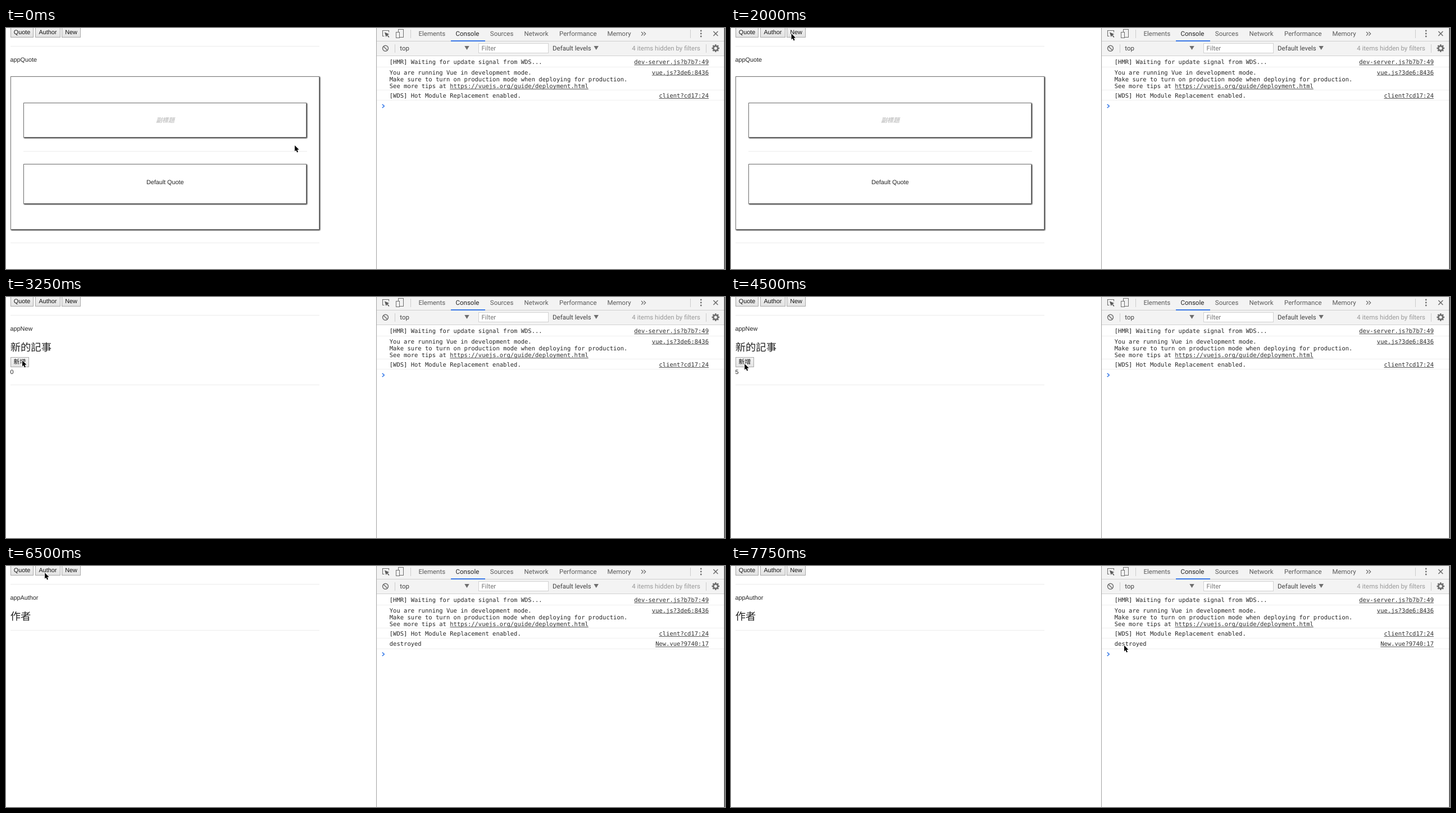
Recreate the animation shown at these times as an HTML page with a canvas. Size 1280 px wide and 429 px high, loop 8 s.

```html
<!DOCTYPE html>
<html lang="zh-Hant">
<head>
<meta charset="utf-8">
<title>Component switching</title>
<style>
  html, body { margin: 0; width: 100%; height: 100%; overflow: hidden; background: #fff; }
  canvas { display: block; }
</style>
</head>
<body>
<canvas id="stage" width="1280" height="429"></canvas>
<script>
const ctx = document.getElementById('stage').getContext('2d');
const LOOP = 8000;
const PAGE = '10.8px "Liberation Sans", Arial, sans-serif';
const CJK = '"Noto Sans CJK TC", "Noto Sans CJK JP", "Noto Sans CJK", sans-serif';
const UI = '11.5px Roboto, sans-serif';
const MONO = '10.5px "DejaVu Sans Mono", monospace';

// [start ms, tip x, tip y]
const cursorPath = [
  [0, 514, 209], [500, 480.5, 195], [750, 159.5, 71.5], [1000, 119.3, 26.8],
  [1250, 107.5, 10], [3000, 88.8, 60.5], [3250, 29, 113], [3500, 24.2, 119],
  [5000, 37.3, 67], [5250, 59.3, 11.8], [5500, 66, 10], [6500, 69, 12],
  [6750, 940, 85], [7000, 706, 150], [7250, 696.8, 148.5], [7500, 703.8, 143.5],
  [7750, 700, 141.3]
];
const counts = [[0, 0], [3750, 1], [4000, 2], [4250, 4], [4500, 5]];
const pages = [[0, 'quote'], [2500, 'new'], [6500, 'author']];

const at = (keys, t) => keys.filter(k => k[0] <= t).pop();

function text(str, x, y, font = PAGE, color = '#222', align = 'left') {
  ctx.font = font;
  ctx.fillStyle = color;
  ctx.textAlign = align;
  ctx.fillText(str, x, y);
}

function rect(x, y, w, h, color) {
  ctx.fillStyle = color;
  ctx.fillRect(x, y, w, h);
}

function outline(x, y, w, h, color) {
  ctx.lineWidth = 1;
  ctx.strokeStyle = color;
  ctx.strokeRect(x + 0.5, y + 0.5, w - 1, h - 1);
}

function line(points, color, width = 1) {
  ctx.beginPath();
  points.forEach(([x, y]) => ctx.lineTo(x, y));
  ctx.lineWidth = width;
  ctx.strokeStyle = color;
  ctx.stroke();
}

function polygon(points, color) {
  ctx.beginPath();
  points.forEach(([x, y]) => ctx.lineTo(x, y));
  ctx.closePath();
  ctx.fillStyle = color;
  ctx.fill();
}

function circle(x, y, r, color, width) {
  ctx.beginPath();
  ctx.arc(x, y, r, 0, Math.PI * 2);
  ctx.lineWidth = width || 1;
  ctx.fillStyle = ctx.strokeStyle = color;
  width ? ctx.stroke() : ctx.fill();
}

function button(label, x, y, w, h, baseline, font = PAGE, pressed = false) {
  const fill = ctx.createLinearGradient(0, y, 0, y + h);
  fill.addColorStop(0, pressed ? '#d4d4d4' : '#f4f4f4');
  fill.addColorStop(1, pressed ? '#ececec' : '#e2e2e2');
  rect(x, y, w, h, fill);
  outline(x, y, w, h, '#a9a9a9');
  text(label, x + w / 2, baseline, font, '#111', 'center');
}

function card(x, y, w, h) {
  ctx.save();
  ctx.shadowColor = '#000';
  ctx.shadowBlur = 2;
  ctx.shadowOffsetX = ctx.shadowOffsetY = 1;
  rect(x, y, w, h, '#fff');
  ctx.restore();
  outline(x, y, w, h, '#777');
}

const rule = (y, x = 8, w = 550) => rect(x, y, w, 1, '#ececec');

const drawPage = {
  quote() {
    text('appQuote', 7.6, 60);
    card(8, 86, 550, 273);
    card(31, 133, 504, 62);
    rule(219, 31, 505);
    card(31, 242, 504, 71);
    text('副標題', 283.5, 168, 'italic bold 10.9px ' + CJK, '#c8c8c8', 'center');
    text('Default Quote', 283.2, 277.7, PAGE, '#222', 'center');
    rule(382);
  },
  new(t) {
    text('appNew', 7.6, 60);
    text('新的記事', 7.8, 95.8, '500 18.3px ' + CJK);
    button('新增', 8, 107, 33, 18, 119.4, '10.9px ' + CJK, t >= 4000 && t < 4250);
    text(at(counts, t)[1], 7.6, 137);
    rule(156);
  },
  author() {
    text('appAuthor', 7.6, 60);
    text('作者', 7.8, 95.8, '500 18.3px ' + CJK);
    rule(114);
  }
};

function inspectIcon() {
  line([[673.5, 14.5], [670.5, 14.5], [670.5, 4.5], [681.5, 4.5], [681.5, 7.5]], '#6e6e6e', 1.1);
  polygon([[674, 7.5], [682.3, 11], [679.4, 12.2], [682.5, 16], [681.2, 17],
    [678.3, 13.3], [676.5, 16]], '#5a5a5a');
}

function deviceIcon() {
  outline(698, 2, 10, 15, '#6e6e6e');
  rect(694, 7, 7, 11, '#f3f3f3');
  outline(694, 7, 7, 11, '#6e6e6e');
}

function gear(x, y) {
  for (let i = 0; i < 8; i++) {
    const a = i * Math.PI / 4, c = Math.cos(a), s = Math.sin(a);
    line([[x + c * 3.5, y + s * 3.5], [x + c * 6.8, y + s * 6.8]], '#6e6e6e', 2.6);
  }
  circle(x, y, 3.9, '#6e6e6e', 2.6);
}

function toolbars() {
  rect(660, 0, 619, 49, '#f3f3f3');
  rect(660, 23, 619, 1, '#cfcfcf');
  rect(660, 49, 619, 1, '#d0d0d0');
  inspectIcon();
  deviceIcon();
  [[720, 3], [1218, 3], [692, 29], [1246, 29]].forEach(([x, y]) => rect(x, y, 1, 15, '#ccc'));

  [['Elements', 734.5], ['Console', 800.5], ['Sources', 861.8], ['Network', 922.6],
   ['Performance', 985], ['Memory', 1070.4]].forEach(([name, x]) =>
    text(name, x, 14, UI, name === 'Console' ? '#222' : '#5a5a5a'));
  rect(792, 22, 61, 2, '#3b78e7');
  [1131, 1135.4].forEach(x => line([[x, 7], [x + 3.3, 10.3], [x, 13.6]], '#6e6e6e', 1.3));
  [5, 10, 15].forEach(y => circle(1237.3, y, 1.4, '#6e6e6e'));
  line([[1259.4, 6], [1267.4, 14]], '#6e6e6e', 1.6);
  line([[1267.4, 6], [1259.4, 14]], '#6e6e6e', 1.6);

  circle(675.5, 36.3, 5, '#6e6e6e', 1.5);
  line([[672, 32.8], [679, 39.8]], '#6e6e6e', 1.5);
  text('top', 701.3, 40.3, UI, '#444');
  [[820.5, 32], [1050.7, 32]].forEach(([x, y]) =>
    polygon([[x - 4.2, y], [x + 4.2, y], [x, y + 7]], '#6e6e6e'));
  rect(841, 27, 125, 18, '#fff');
  outline(841, 27, 125, 18, '#d2d2d2');
  text('Filter', 846.5, 40.3, UI, '#777');
  text('Default levels', 973, 40.3, UI, '#444');
  text('4 items hidden by filters', 1236, 40.3, UI, '#9a9a9a', 'right');
  gear(1263.3, 36);
}

function link(str, x, baseline, align = 'left') {
  text(str, x, baseline, MONO, '#303030', align);
  const w = ctx.measureText(str).width;
  rect(align === 'right' ? x - w : x, baseline + 1, w, 1, '#555');
}

function message(lines, baseline, source, bottom) {
  lines.forEach((str, i) => text(str, 682.8, baseline + i * 12.3, MONO, '#262626'));
  link(source, 1251, baseline, 'right');
  rect(660, bottom, 619, 1, '#efefef');
}

function consolePanel(destroyed) {
  rect(659, 0, 1, 429, '#a3a3a3');
  toolbars();
  message(['[HMR] Waiting for update signal from WDS...'], 64.2, 'dev-server.js?b7b7:49', 69);
  message([
    'You are running Vue in development mode.',
    'Make sure to turn on production mode when deploying for production.',
    'See more tips at '
  ], 82.6, 'vue.js?3de6:8436', 110);
  link('https://vuejs.org/guide/deployment.html', 790.3, 107.2);
  message(['[WDS] Hot Module Replacement enabled.'], 124, 'client?cd17:24', 128);
  if (destroyed) message(['destroyed'], 142.4, 'New.vue?9740:17', 147);
  const y = destroyed ? 157 : 139;
  line([[669.8, y - 3.2], [673.3, y], [669.8, y + 3.2]], '#3b7de9', 1.6);
  rect(1278.5, 0, 1.5, 429, '#3c3c3c');
}

function cursor(x, y) {
  const shape = [[0, 0], [0, 10.6], [2.4, 8.4], [4.1, 12.4], [6, 11.6], [4.3, 7.7], [7.6, 7.6]]
    .map(([dx, dy]) => [x + dx, y + dy]);
  ctx.lineJoin = 'round';
  line([...shape, shape[0]], '#fff', 2);
  polygon(shape, '#000');
  ctx.lineJoin = 'miter';
}

function draw(t) {
  rect(0, 0, 1280, 429, '#fff');
  button('Quote', 8, -4, 41, 21, 10.8);
  button('Author', 52, -4, 45, 21, 10.8);
  button('New', 99, -4, 34, 21, 10.8);
  rule(32);
  const page = at(pages, t)[1];
  drawPage[page](t);
  consolePanel(page === 'author');
  const [, x, y] = at(cursorPath, t);
  cursor(x, y);
}

ctx.textRendering = 'geometricPrecision';
const start = performance.now();
function tick() {
  draw((performance.now() - start) % LOOP);
  requestAnimationFrame(tick);
}
tick();
</script>
</body>
</html>
```
